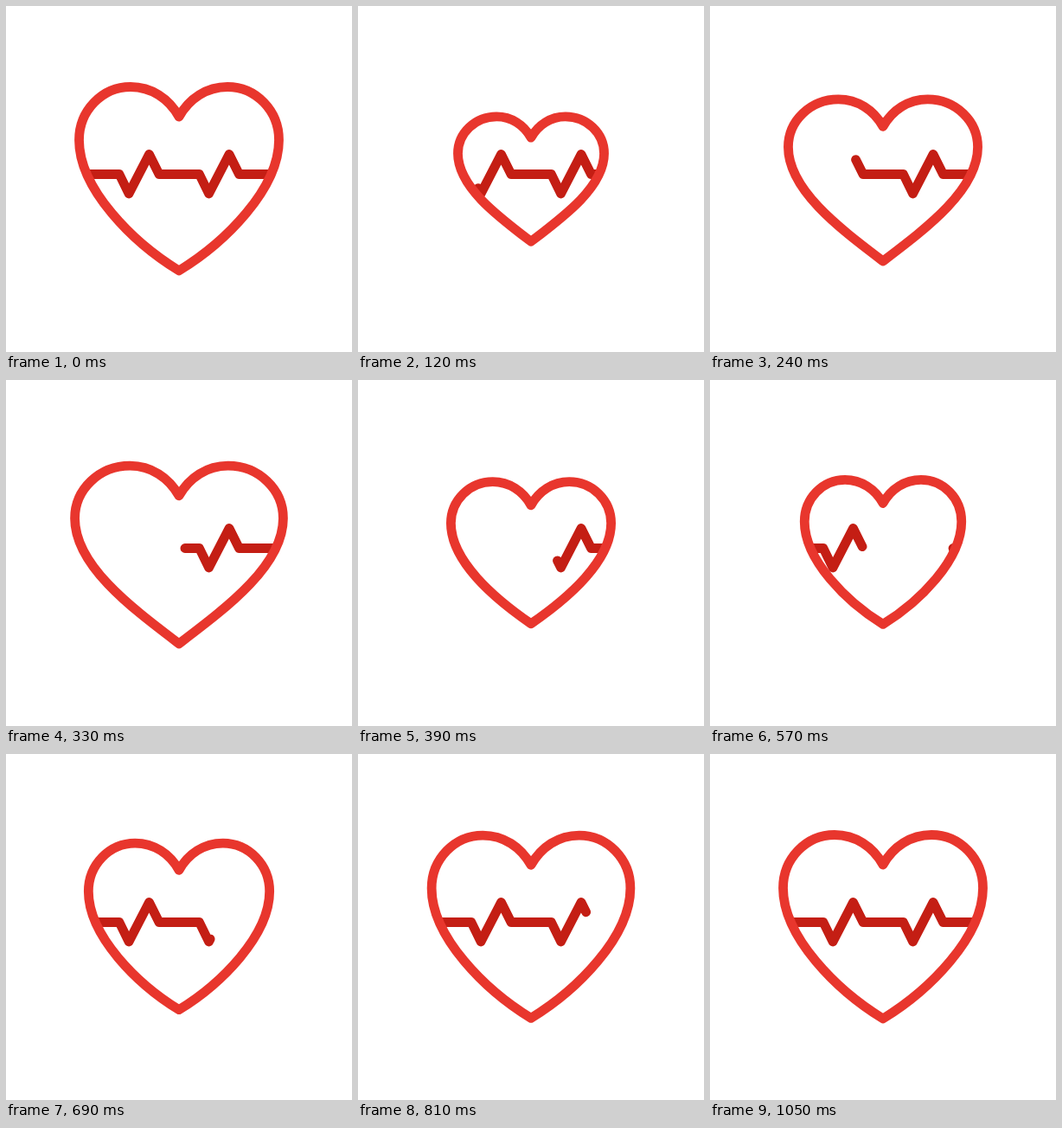
An HTML page with a canvas that plays this animation: 400 px wide and 400 px high, repeating every 1290 ms.

```html
<!DOCTYPE html>
<html lang="en">
<head>
<meta charset="utf-8">
<title>Heartbeat</title>
<style>
html, body { margin: 0; width: 100%; height: 100%; overflow: hidden; background: #fff; }
canvas { display: block; width: 400px; height: 400px; }
</style>
</head>
<body>
<canvas id="stage" width="400" height="400"></canvas>
<script>
const ctx = document.getElementById('stage').getContext('2d');
const LOOP = 1290, STEP = 30;
const CX = 200, CY = 195.5, MID = 194.5;
const RED = '#e8362d', DARK = '#c41e14';

// The heart blends between a tall and a broad shape while its size beats
const TALL = { notch: 128, lobe: 56, top: 93.5, side: 115.5, wide: 155, tip: 306, rise: 0.215 };
const BROAD = { notch: 134, lobe: 56.5, top: 99.5, side: 120, wide: 160, tip: 304.5, rise: 0.29 };

const clamp = x => Math.min(1, Math.max(0, x));
const part = (t, from, to) => clamp((t - from) / (to - from));
const mix = (a, b, u) => a + (b - a) * u;
const ease = u => u * u * (3 - 2 * u);
const easeOut = (u, power) => 1 - (1 - u) ** power;

function sizeAt(t) {
  if (t < 150) return mix(1, 0.67, ease(part(t, 0, 150)));
  if (t < 300) return mix(0.67, 1.045, ease(part(t, 150, 300)));
  if (t < 450) return mix(1.045, 0.646, ease(part(t, 300, 450)));
  return mix(0.646, 1, easeOut(part(t, 450, 825), 1.3));
}

function heartPath(t) {
  const size = sizeAt(t);
  const breadth = ease(part(t, 0, 120)) * ease(part(t, 450, 330));
  const get = key => mix(TALL[key], BROAD[key], breadth);
  const across = key => get(key) * size;
  const down = key => CY + (get(key) - CY) * size;

  const lobe = across('lobe'), side = across('side');
  const notch = down('notch'), top = down('top'), wide = down('wide'), tip = down('tip');
  const dip = notch - (notch - top) * 0.61;
  const crown = mix(lobe, side, 0.555);
  const shoulder = mix(wide, top, 0.55);
  const hip = mix(wide, tip, 0.375);
  const low = mix(tip, wide, get('rise'));

  const path = new Path2D();
  for (const s of [-1, 1]) {
    const curve = (a, b, c, d, e, f) =>
      path.bezierCurveTo(CX + s * a, b, CX + s * c, d, CX + s * e, f);
    if (s < 0) {
      path.moveTo(CX, notch);
      curve(lobe * 0.21, dip, lobe * 0.57, top, lobe, top);
      curve(crown, top, side, shoulder, side, wide);
      curve(side, hip, side * 0.46, low, 0, tip);
    } else {
      curve(side * 0.46, low, side, hip, side, wide);
      curve(side, shoulder, crown, top, lobe, top);
      curve(lobe * 0.57, top, lobe * 0.21, dip, 0, notch);
    }
  }
  path.closePath();
  return path;
}

// A flat line with the same spike twice
const pulse = [[84, MID]];
for (const x of [131, 223.5]) {
  pulse.push([x, MID], [x + 11, MID + 22.5], [x + 34.5, MID - 23], [x + 46, MID]);
}
pulse.push([316, MID]);
const pulseLength = pulse.slice(1).reduce(
  (sum, [x, y], i) => sum + Math.hypot(x - pulse[i][0], y - pulse[i][1]), 0);

function strokePulse(from, to) {
  if (to - from < 0.5) return;
  ctx.setLineDash([to - from, pulseLength * 2]);
  ctx.lineDashOffset = -from;
  ctx.beginPath();
  pulse.forEach(([x, y]) => ctx.lineTo(x, y));
  ctx.stroke();
}

function draw(t) {
  const heart = heartPath(t);
  ctx.fillStyle = '#fff';
  ctx.fillRect(0, 0, 400, 400);
  ctx.lineWidth = 10.8;
  ctx.lineCap = ctx.lineJoin = 'round';

  ctx.save();
  ctx.clip(heart);
  ctx.strokeStyle = DARK;
  strokePulse(0, pulseLength * easeOut(part(t, 387, 1050), 1.725));
  strokePulse(t * 0.542, pulseLength);
  ctx.restore();

  ctx.strokeStyle = RED;
  ctx.stroke(heart);
}

const start = performance.now();
function frame() {
  const t = (performance.now() - start) % LOOP;
  draw(Math.floor(t / STEP) * STEP);
  requestAnimationFrame(frame);
}
frame();
</script>
</body>
</html>
```
